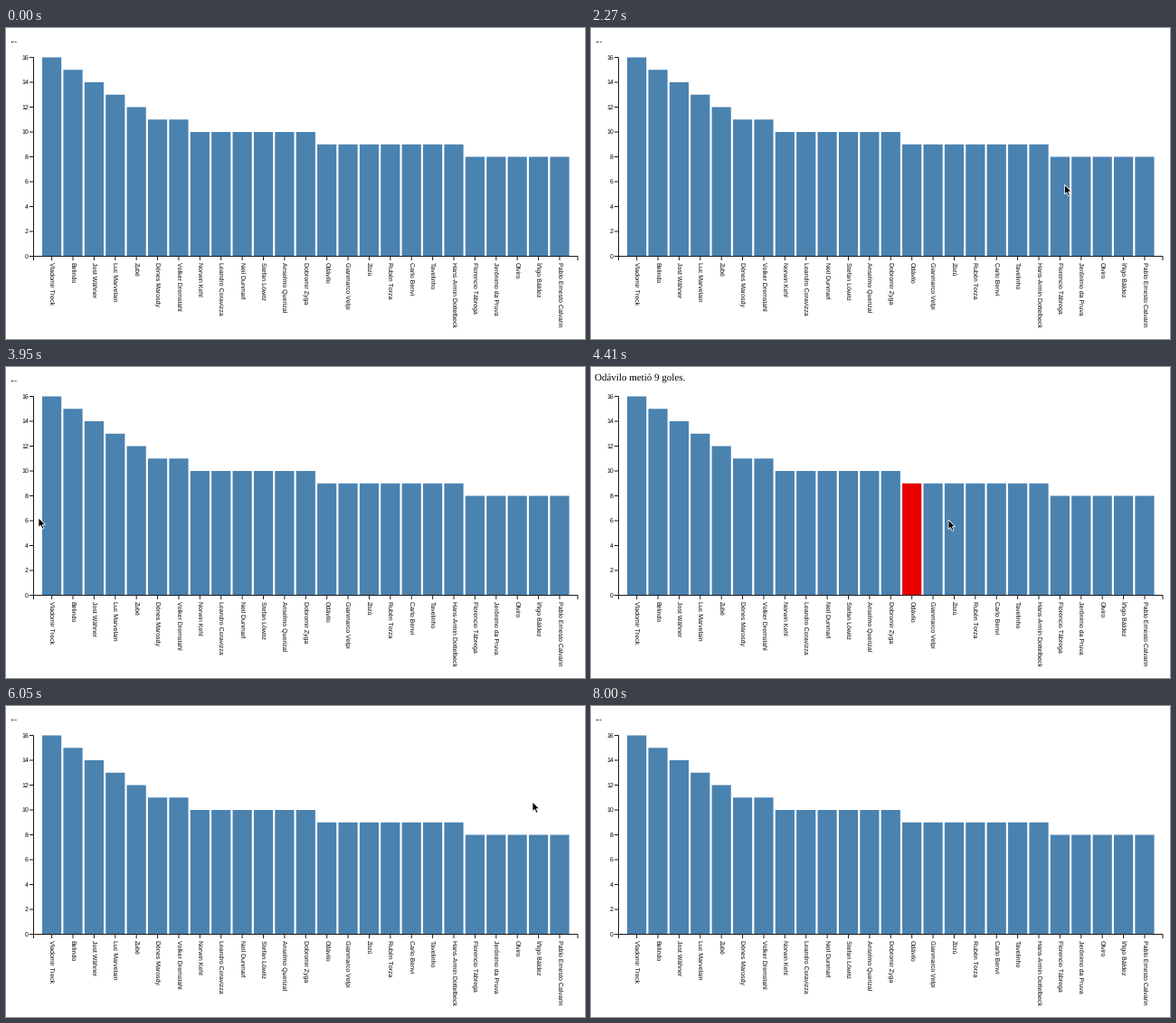
These frames come from a looping animation (640x344 px, 8.05 s). A matplotlib script:

```python
import matplotlib.pyplot as plt
import numpy as np
from matplotlib.animation import FuncAnimation
from matplotlib.patches import Polygon, Rectangle

W, H, DPI = 640, 344, 100
FRAMES, STEP = 175, 46
BLUE, RED, INK = "#4a82b0", "#e80000", "#1a1a1a"
AXIS_X, BASE, UNIT = 30.5, 252.5, 13.75
LEFT, PITCH, BAR_W = 40, 23.39, 21.2

NAMES = [
    "Vladomir Treck", "Belindo", "Jost Wähner", "Luc Marvelain", "Zubé",
    "Dénes Marosdy", "Volker Dremstahl", "Norwin Kehl", "Leandro Coravizza",
    "Neil Dunmarl", "Stefan Löwitz", "Anselmo Querizal", "Dobromir Zyga",
    "Odávilo", "Gianmarco Velpi", "Zozú", "Rubén Torza", "Carlo Benvi",
    "Tavelinho", "Hans-Armin Dottelbeck", "Florencio Tábrega",
    "Jerônimo da Pruva", "Olviro", "Íñigo Báldez", "Pablo Ernesto Calvarin",
]
GOALS = [16, 15, 14, 13, 12] + [11] * 2 + [10] * 6 + [9] * 7 + [8] * 5

# Key points of the pointer's sweeps: step, x, y
PATH = np.array([
    (17, 95, 350), (22, 125, 235), (35, 319, 190), (48, 530, 175),
    (64, 115, 143), (68, 102, 142), (80, 60, 158), (86, 45, 168),
    (95, 395, 169), (101, 535, 185), (119, 612, 190), (131, 582, 106),
    (146, 433, 181), (162, 270, 352),
], float)
KEYS, POINTS = PATH[:, 0], PATH[:, 1:]
SLOPES = np.gradient(POINTS, KEYS, axis=0)
ARROW = np.array([(0, 0), (0, 10.6), (2.4, 8.4), (4.2, 12.4),
                  (6, 11.6), (4.3, 7.7), (7.6, 7.6)])

plt.rcParams.update({"font.family": "Liberation Sans",
                     "text.hinting": "none", "text.hinting_factor": 1})
fig = plt.figure(figsize=(W / DPI, H / DPI), dpi=DPI, facecolor="white")
ax = fig.add_axes([0, 0, 1, 1])
ax.set_xlim(0, W)
ax.set_ylim(H, 0)
ax.axis("off")


def pt(px):
    return px * 72 / DPI


def line(xs, ys):
    ax.plot(xs, ys, color=INK, lw=pt(1), snap=False,
            solid_capstyle="butt", solid_joinstyle="miter")


def label(x, y, text, size=7, **kw):
    return ax.text(x, y, text, fontsize=pt(size), color="black",
                   va="baseline", **kw)


bars = []
for i, (name, goals) in enumerate(zip(NAMES, GOALS)):
    x = LEFT + i * PITCH
    bar = Rectangle((x, BASE - goals * UNIT), BAR_W, goals * UNIT,
                    fc=BLUE, lw=0, snap=False)
    bars.append(ax.add_patch(bar))
    mid = x + BAR_W / 2
    line([mid, mid], [BASE, BASE + 4.5])
    label(mid - 2.3, 259, name, rotation=-90, rotation_mode="anchor",
          ha="left")

line([AXIS_X, AXIS_X, 632, 632], [BASE + 4.5, BASE, BASE, BASE + 4.5])
line([AXIS_X, AXIS_X], [BASE - 16 * UNIT, BASE])
for v in range(0, 17, 2):
    y = BASE - v * UNIT
    line([AXIS_X - 4.5, AXIS_X], [y, y])
    label(25, y + 2.4, str(v), ha="right")

status = label(4, 15.5, "...", 11, family="Liberation Serif")
arrow = ax.add_patch(Polygon(ARROW, closed=True, fc="black", ec="white",
                             lw=pt(0.8), zorder=5))


def pointer(k):
    """Position on a smooth curve through PATH, or None when off stage."""
    if not KEYS[0] <= k <= KEYS[-1]:
        return None
    i = min(np.searchsorted(KEYS, k, side="right") - 1, len(KEYS) - 2)
    span = KEYS[i + 1] - KEYS[i]
    u = (k - KEYS[i]) / span
    ease = u * u * (3 - 2 * u)
    return (POINTS[i] * (1 - ease) + POINTS[i + 1] * ease
            + span * u * (1 - u) * ((1 - u) * SLOPES[i] - u * SLOPES[i + 1]))


def hit(pos):
    """Index of the bar under the pointer, or None."""
    if pos is None:
        return None
    x, y = pos
    i, offset = divmod(x - LEFT, PITCH)
    i = int(i)
    if 0 <= i < len(bars) and offset <= BAR_W:
        if BASE - GOALS[i] * UNIT <= y <= BASE:
            return i
    return None


def draw(k):
    pos = pointer(k)
    arrow.set_visible(pos is not None)
    if pos is not None:
        arrow.set_xy(ARROW + pos)
    # The page reacts one step behind the pointer
    active = hit(pointer(k - 1))
    for i, bar in enumerate(bars):
        bar.set_facecolor(RED if i == active else BLUE)
    status.set_text("..." if active is None else
                    f"{NAMES[active]} metió {GOALS[active]} goles.")
    return [*bars, status, arrow]


anim = FuncAnimation(fig, draw, frames=FRAMES, interval=STEP,
                     repeat=True, repeat_delay=0)
plt.show()
```
